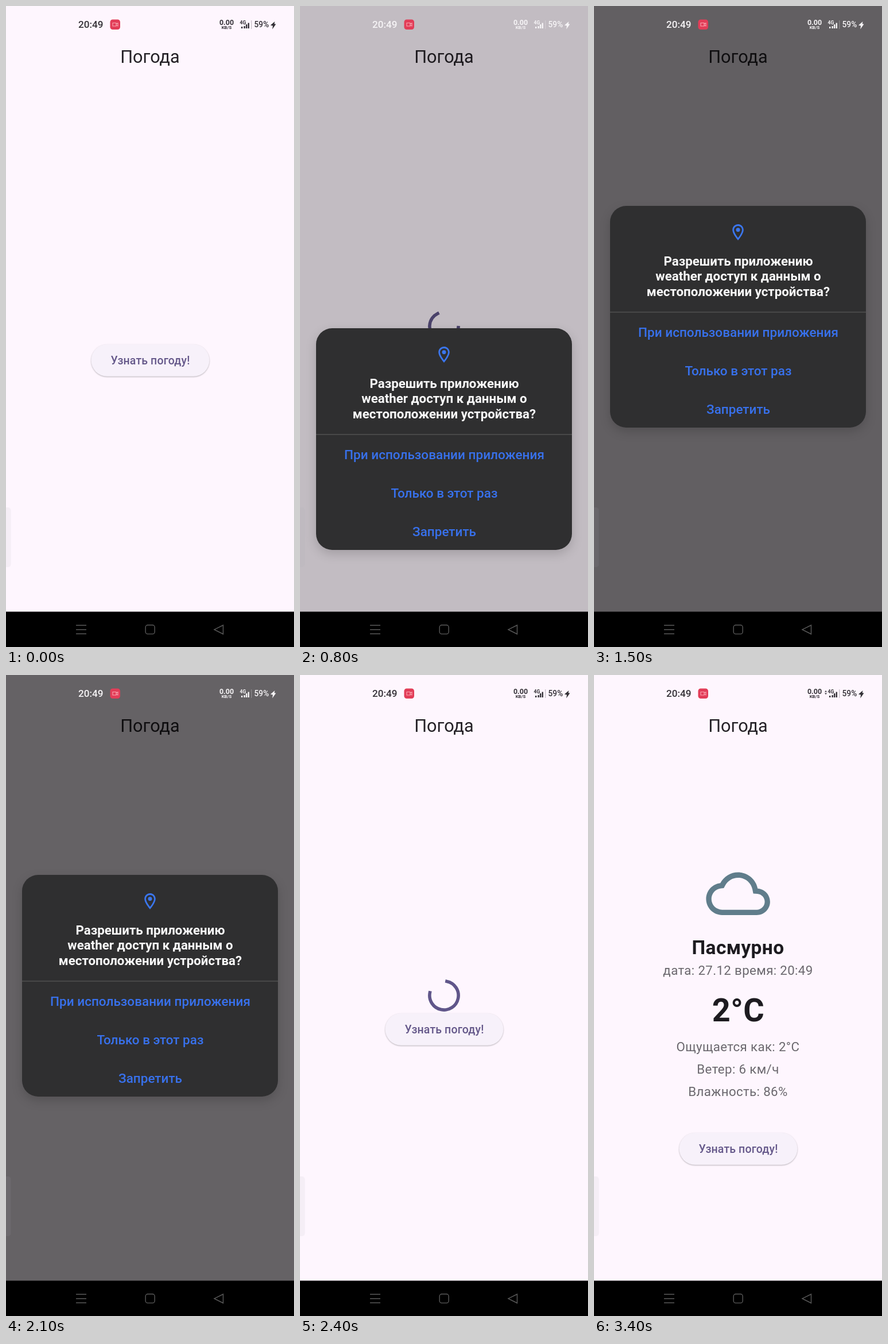
These frames come from a looping animation (502 px wide and 1116 px high, 3900 ms). An HTML page:

```html
<!DOCTYPE html>
<html lang="ru">
<head>
<meta charset="utf-8">
<title>Погода</title>
<style>
  html, body { margin: 0; width: 100%; height: 100%; overflow: hidden; background: #fef6fe; }
  svg { display: block; width: 100vw; height: 100vh; font-family: Roboto, "Noto Sans", sans-serif; }
  .mid { text-anchor: middle; }
  .medium { font-weight: 500; }
  .bold { font-weight: 700; }
  .button rect { fill: #f7f1fa; filter: drop-shadow(0 1.4px 1.2px rgba(0, 0, 0, .28)); }
  .button text { font-size: 19.5px; letter-spacing: .14px; fill: #65588a; }
  .info { font-size: 22.3px; letter-spacing: .35px; fill: #6b686e; }
  .card { fill: #2f2f30; filter: drop-shadow(0 7px 9px rgba(0, 0, 0, .16)); }
  .ask { font-size: 22.3px; fill: #fafafa; }
  .choice { font-size: 22.5px; fill: #3871ec; }
  .nav { fill: none; stroke: #595959; stroke-width: 1.4; }
</style>
</head>
<body>
<svg viewBox="0 0 502 1116" preserveAspectRatio="none">
  <rect width="502" height="1116" fill="#fef6fe"/>
  <text class="mid" x="251" y="99" font-size="30.7" fill="#242126">Погода</text>

  <g id="weather">
    <path fill="#607d8b" transform="translate(195.4 325) scale(4.646)" d="M19.35 10.04C18.67 6.59 15.64 4 12 4 9.11 4 6.6 5.64 5.35 8.04 2.34 8.36 0 10.91 0 14c0 3.31 2.69 6 6 6h13c2.76 0 5-2.24 5-5 0-2.64-2.05-4.78-4.65-4.96zM19 18H6c-2.21 0-4-1.79-4-4 0-2.05 1.53-3.76 3.56-3.97l1.07-.11.5-.95C8.08 7.14 9.94 6 12 6c2.62 0 4.88 1.86 5.39 4.43l.3 1.5 1.53.11c1.56.1 2.78 1.41 2.78 2.96 0 1.65-1.35 3-3 3z"/>
    <g class="mid">
      <text class="bold" x="251" y="486" font-size="33.46" letter-spacing=".35" fill="#1d1b20">Пасмурно</text>
      <text class="info" x="251" y="522">дата: 27.12 время: 20:49</text>
      <text class="bold" x="251.5" y="603" font-size="55.8" letter-spacing=".35" fill="#1d1b20">2°C</text>
      <text class="info" x="251" y="654.5">Ощущается как: 2°C</text>
      <text class="info" x="251" y="693.5">Ветер: 6 км/ч</text>
      <text class="info" x="251" y="732.5">Влажность: 86%</text>
    </g>
  </g>

  <path id="spinner" fill="none" stroke="#60568a" stroke-width="5.6" stroke-linecap="square"/>
  <g id="button" class="button mid">
    <rect x="148.5" y="-28" width="206" height="55.8" rx="27.9"/>
    <text class="medium" x="251.5" y="6.5">Узнать погоду!</text>
  </g>

  <rect id="dim" width="502" height="1055"/>

  <g id="dialog">
    <rect class="card" x="28" width="446" height="386" rx="28"/>
    <g fill="#3b76ee" transform="translate(234.3 29.3) scale(1.394)">
      <path d="M12 2C8.13 2 5 5.13 5 9c0 5.25 7 13 7 13s7-7.75 7-13c0-3.87-3.13-7-7-7zM7 9c0-2.76 2.24-5 5-5s5 2.24 5 5c0 2.88-2.88 7.19-5 9.88C9.92 16.21 7 11.85 7 9z"/>
      <circle cx="12" cy="9" r="2.5"/>
    </g>
    <g class="ask bold mid">
      <text x="251.5" y="103.5">Разрешить приложению</text>
      <text x="251.5" y="130">weather доступ к данным о</text>
      <text x="251.5" y="156.5">местоположении устройства?</text>
    </g>
    <path d="M28 185H474" stroke="#505051" stroke-width="1.4"/>
    <g class="choice medium mid">
      <text x="251.5" y="228">При использовании приложения</text>
      <text x="251.5" y="295">Только в этот раз</text>
      <text x="251.5" y="362">Запретить</text>
    </g>
  </g>

  <rect x="-8" y="873" width="16.5" height="104" rx="5" fill="#aaa8ac" opacity=".1"/>

  <g id="status">
    <text class="medium" x="126" y="38" font-size="17.2">20:49</text>
    <text class="mid bold" x="384.5" y="32.5" font-size="12.5">0.00</text>
    <text class="mid bold" x="384.5" y="40" font-size="7.8">KB/S</text>
    <text class="bold" x="407.5" y="32" font-size="8.5">4G</text>
    <path d="M410 36h2.4v3H410zM414.5 35h2.4v4h-2.4zM418 32h2.4v7H418zM421.6 29.5h2.4v9.5h-2.4z"/>
    <path d="M427 25h1.4v15H427z" opacity=".25"/>
    <text class="medium" x="432.5" y="37" font-size="13.8">59%</text>
    <path d="M461 33.5L468.5 27l-.8 4.2 2.8.4-6.3 9 .9-6z"/>
    <path id="arrows" d="M402 29.5l2-2.5 2 2.5zM402 31.5l2 2.5 2-2.5z"/>
  </g>
  <rect x="181.5" y="23.5" width="17.5" height="17.5" rx="4.5" fill="#e23d58"/>
  <path d="M186 29.5h6v5.5h-6zM192 31.5l3-1.8v5.2l-3-1.8z" fill="none" stroke="#f9a3ae" stroke-width="1.1"/>

  <rect y="1054.5" width="502" height="62"/>
  <path class="nav" d="M122 1078.3H140M122 1085.7H140M122 1093H140M378.5 1078v15.5L363 1085.7z"/>
  <rect class="nav" x="243.2" y="1077.8" width="16" height="15.6" rx="4"/>
</svg>
<script>
const LOOP = 3900, STEP = 100, LAST = 3400;
const TAP = 390, LOADED = 2800, ASK = 700, ANSWER = 2100;

const el = id => document.getElementById(id);
const [weather, spinner, button, dim, dialog, status, arrows] =
  ["weather", "spinner", "button", "dim", "dialog", "status", "arrows"].map(el);
const clamp = (v, lo = 0, hi = 1) => Math.min(hi, Math.max(lo, v));
const show = (node, on) => node.setAttribute("visibility", on ? "visible" : "hidden");
const moveY = (node, y) => node.setAttribute("transform", `translate(0 ${y})`);

// cubic-bezier(.4, 0, .2, 1)
function ease(x) {
  if (x <= 0 || x >= 1) return clamp(x);
  let lo = 0, hi = 1, u;
  for (let i = 0; i < 24; i++) {
    u = (lo + hi) / 2;
    const bx = 1.2 * u * (1 - u) ** 2 + .6 * u * u * (1 - u) + u ** 3;
    if (bx < x) lo = u; else hi = u;
  }
  return u * u * (3 - 2 * u);
}

// Head runs ahead in the first half of a cycle, tail catches up in the second
function spinnerArc(t) {
  const p = (t % 1333) / 1333;
  const head = ease(p * 2) * 270, tail = ease(p * 2 - 1) * 270;
  const start = -90 + tail + t / 2222 * 360 + p * 90;
  const sweep = Math.max(head - tail, .1);
  const point = deg => {
    const a = deg * Math.PI / 180;
    return `${251 + 25.1 * Math.cos(a)} ${558 + 25.1 * Math.sin(a)}`;
  };
  return `M${point(start)}A25.1 25.1 0 ${+(sweep > 180)} 1 ${point(start + sweep)}`;
}

function dialogTop(t) {
  if (t < ANSWER) return 348 + 213 * Math.exp((800 - t) / 58.6);
  return 348 + 420 * ((t - ANSWER) / 100) ** 2;
}

function dimLevel(t) {
  return t < ANSWER
    ? clamp((t - ASK) * .00235, 0, .61)
    : clamp(.6 - (t - ANSWER) * .0023);
}

function draw(t) {
  const loaded = t >= LOADED, loading = t >= TAP && !loaded;
  show(weather, loaded);
  show(arrows, loaded);
  show(spinner, loading);
  if (loading) spinner.setAttribute("d", spinnerArc(t - TAP));
  moveY(button, loaded ? 825 : 617);

  dim.setAttribute("opacity", dimLevel(t));
  show(dialog, t >= ASK && t < ANSWER + 200);
  moveY(dialog, dialogTop(t));
  status.setAttribute("fill", t >= 800 && t < 2300 ? "#f6f4f6" : "#343137");
}

const began = performance.now();
function tick() {
  const t = (performance.now() - began) % LOOP;
  draw(Math.min(LAST, Math.floor(t / STEP) * STEP));
  requestAnimationFrame(tick);
}
tick();
</script>
</body>
</html>
```
